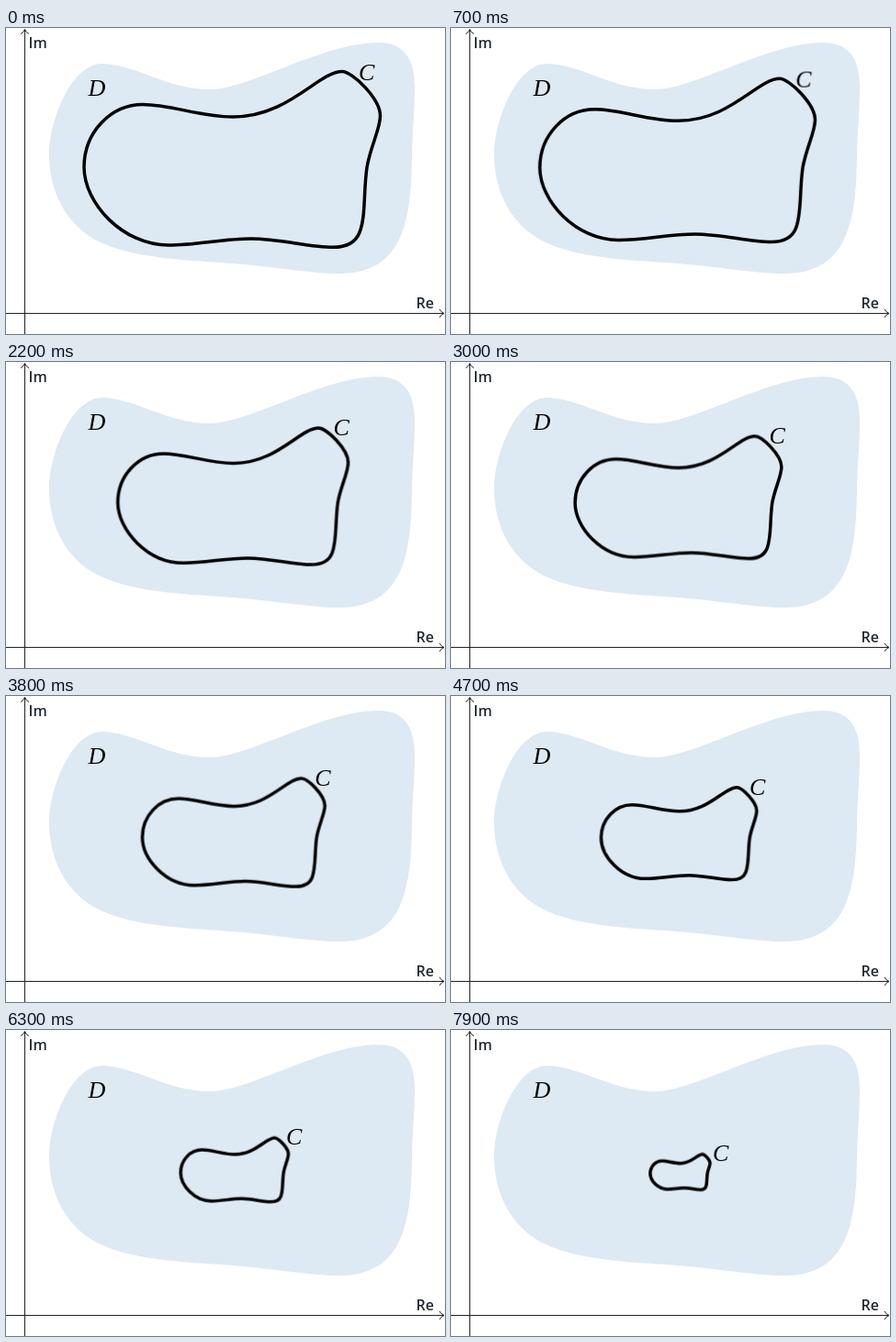
An HTML page for the animation above (8000 ms loop, 478x334 px).

```html
<!DOCTYPE html>
<html lang="en">
<head>
<meta charset="utf-8">
<title>Contracting a contour</title>
<style>
html, body { margin: 0; width: 100%; height: 100%; overflow: hidden; background: #fff; }
svg { display: block; width: 478px; height: 334px; }
.axis { fill: none; stroke: #222; stroke-width: 1; }
.axis-name { font: 600 16px "Open Sans", "Noto Sans", sans-serif; fill: #222a30; }
.math { font: italic 26px "Liberation Serif", "Noto Serif", serif; }
.domain { fill: #dde9f3; }
.contour {
  fill: none; stroke: #000; stroke-width: 3.5; stroke-linejoin: round;
  vector-effect: non-scaling-stroke;
  transform-origin: 250.3px 157.8px;
  animation: shrink 8s steps(80) infinite;
}
.label { animation: follow 8s steps(80) infinite; }
/* 80 steps, each 1/99 of the full size */
@keyframes shrink { from { transform: scale(1); } to { transform: scale(.19192); } }
@keyframes follow { from { transform: translate(0, 0); } to { transform: translate(-100.3px, 87.1px); } }
</style>
</head>
<body>
<svg viewBox="0 0 478 334">
  <path class="domain" d="M47 138C47 100 72 39 104 39C140 39 175 67 222 67C265 67 345 16 405 16C437 16 445 38 445 65C445 90 442.5 110 442 140C441 205 435 268 363 268C330 268 290 260 240 256.5C190 253 140 251 103 234C65 216 47 178 47 138Z"/>
  <path class="axis" d="M20.5 334V1.5M16 6.5Q19.5 4.5 20.5 1.5Q21.5 4.5 25 6.5"/>
  <path class="axis" d="M0 311.5H477M472 307Q474 310.5 477 311.5Q474 312.5 472 316"/>
  <text class="axis-name" x="24.5" y="22">Im</text>
  <text class="axis-name" x="446.5" y="306">Re</text>
  <text class="math" x="89.5" y="73.5">D</text>
  <path class="contour" d="M85 152C85 114 114 83.5 149 83.5C179 83.5 212 97 247 97C308 97 340 47.5 366 47.5C377 47.5 407.5 77 407.5 96C407.5 110 397 129 393 152C389 180 392 205 385 223C380 236 368 239.3 356 239.3C330 239.3 298 230 267 230C236 230 208 237 177 237C127 237 85 191 85 152Z"/>
  <text class="math label" x="384" y="56.5">C</text>
</svg>
</body>
</html>
```
